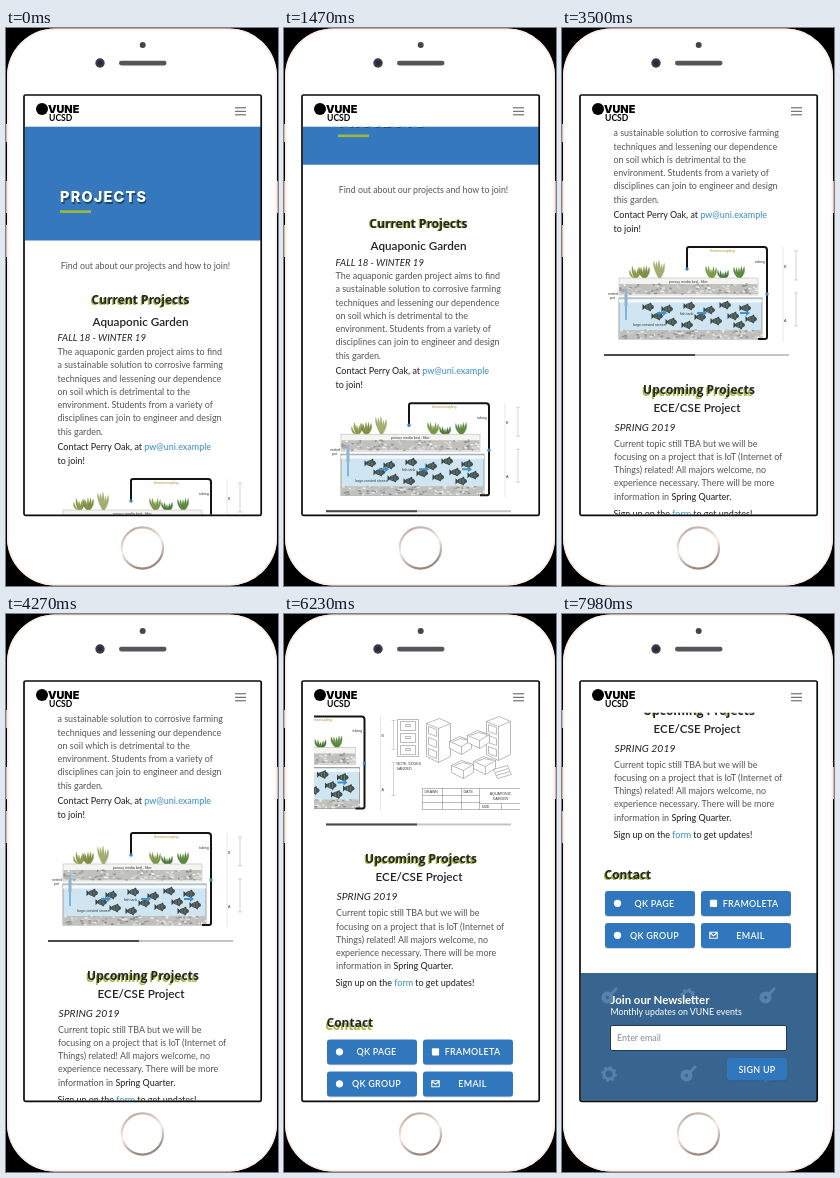
Recreate the animation shown at these times as an HTML page. Size 272 by 558 pixels, loop 8.05 s.

```html
<!DOCTYPE html>
<html lang="en">
<head>
<meta charset="utf-8">
<title>Projects page on a phone</title>
<style>
  html, body { margin: 0; width: 100%; height: 100%; overflow: hidden; background: #000; }
  body > svg { display: block; width: 100vw; height: 100vh; }
  text { font: 8.95px Lato, sans-serif; fill: #555; white-space: pre; }
  .mid { text-anchor: middle; }
  .intro { font-size: 8.8px; text-anchor: middle; }
  .dark { fill: #2c2c2c; font-weight: 500; }
  .link { fill: #4694cb; }
  .italic { font-style: italic; font-size: 9.6px; fill: #222; }
  .season { font-style: italic; font-size: 10.4px; fill: #222; }
  .sub { font-size: 11.7px; font-weight: 600; fill: #222; text-anchor: middle; }
  .fancy { font: 700 12px "Open Sans", sans-serif; fill: #242424; }
  .fancy.glow { fill: #a3b63c; }
  .hero { font: 800 14.4px Inter, sans-serif; letter-spacing: 1.25px; fill: #fff; }
  .hero.shade { fill: #000; opacity: .4; }
  .brand { font: 900 10.8px Inter, sans-serif; fill: #000; }
  .campus { font: 700 8.6px Lato, sans-serif; fill: #000; }
  .button { fill: #fff; font-weight: 600; letter-spacing: .3px; text-anchor: middle; }
  .join { fill: #fff; font-size: 11.4px; font-weight: 700; }
  .note { fill: #fff; font-size: 8.8px; }
  .hint { fill: #8b8b8b; }
  .tiny { font: 3.6px "Liberation Sans", sans-serif; fill: #333; }
  .amber { fill: #b8862f; }
  .plan { fill: #fff; stroke: #777; stroke-width: .5; }
</style>
</head>
<body>
<svg viewBox="0 0 272 558" preserveAspectRatio="none">
  <defs>
    <clipPath id="screen"><rect x="19" y="68" width="236" height="418.5"/></clipPath>
    <clipPath id="slides"><rect x="30" y="448" width="206" height="99"/></clipPath>
    <linearGradient id="ring" x2=".35" y2="1">
      <stop stop-color="#b39d93"/><stop offset=".3" stop-color="#d9c8bf"/>
      <stop offset=".55" stop-color="#f6efeb"/><stop offset="1" stop-color="#9b877e"/>
    </linearGradient>
    <g id="fish">
      <path d="M-6.5-3 L-3.4 0 L-6.5 3.2 Z M-1.5-2.4 L2-4.6 L2.6-2 Z M-1.5 2.4 L1.5 4.4 L2.6 2 Z" fill="#33413f"/>
      <ellipse rx="5" ry="3" fill="#43514f"/><path d="M-2-2V2M1-2.3V2.3" stroke="#8a9791" stroke-width=".6"/>
    </g>
    <g id="gear" fill="none" stroke="#5483ad">
      <circle r="5" stroke-width="3"/><circle r="7" stroke-width="1.6" stroke-dasharray="2.75"/>
    </g>
    <g id="key" fill="#5483ad">
      <circle cx="-1.5" cy="1.5" r="6"/><path d="M2-2 L8-8" stroke="#5483ad" stroke-width="2.6"/>
      <circle cx="-1.5" cy="1.5" r="1.7" fill="#38658f"/>
    </g>
  </defs>

  <path d="M0 96h2v18H0ZM0 153h2v32H0ZM0 197h2v32H0ZM270 153h2v32h-2Z" fill="#d9b9a8"/>
  <rect x="1" y=".5" width="270" height="557" rx="48" fill="#ecd9cf"/>
  <rect x="1.8" y="1.3" width="268.4" height="555.4" rx="47" fill="#fff" stroke="#fbece4" stroke-width="1.6"/>
  <circle cx="136.7" cy="17" r="3" fill="#45464b"/>
  <circle cx="94" cy="35" r="4.7" fill="#3a3b42"/><circle cx="94" cy="35" r="2.2" fill="#20284a"/>
  <rect x="113" y="32.8" width="47.5" height="4.6" rx="2.3" fill="#55565b"/>
  <circle cx="136.4" cy="520" r="20.6" fill="#fff" stroke="url(#ring)" stroke-width="2.2"/>

  <rect x="18" y="67" width="237.2" height="420.3" rx="1.5" fill="#fff"/>
  <g clip-path="url(#screen)">
    <g id="page"></g>
    <rect x="18" y="67" width="238" height="31.7" fill="#fff"/>
    <circle cx="36" cy="81" r="6" fill="#000"/>
    <text class="brand" x="42" y="84.5">VUNE</text>
    <text class="campus" x="43" y="93.4">UCSD</text>
    <path d="M229 79.8h11M229 83.3h11M229 86.8h11" stroke="#555"/>
  </g>
  <rect x="18" y="67" width="237.2" height="420.3" rx="1.5" fill="none" stroke="#0b0b0d" stroke-width="1.7"/>
</svg>

<script>
const LOOP = 8050, STEP = 70;

let seed = 7;
const random = () => (seed = seed * 16807 % 2147483647) / 2147483647;

const text = (x, y, content, cls = '') => `<text x="${x}" y="${y}" class="${cls}">${content}</text>`;
const rect = (x, y, w, h, fill, extra = '') =>
  `<rect x="${x}" y="${y}" width="${w}" height="${h}" fill="${fill}" ${extra}/>`;
const path = (d, stroke, width = 1, fill = 'none') =>
  `<path d="${d}" stroke="${stroke}" stroke-width="${width}" fill="${fill}"/>`;
const plan = d => `<path class="plan" d="${d}"/>`;
const repeat = (n, draw) => Array.from({ length: n }, (_, i) => draw(i)).join('');
const lines = (x, y, step, rows) => rows.map((row, i) => text(x, y + i * step, row)).join('');
const fancy = (x, y, content, cls = '') =>
  `<g class="glow-shift" data-y="${y}">${text(x, y, content, 'fancy glow ' + cls)}</g>` + text(x, y, content, 'fancy ' + cls);

const gravel = (x, y, w, h) => rect(x, y, w, h, '#c2c0bc') + repeat(150, () => {
  const shade = 140 + random() * 105 | 0;
  return `<ellipse cx="${x + random() * w}" cy="${y + random() * h}" rx="${1 + random()}" ry=".9" fill="rgb(${shade},${shade},${shade})"/>`;
});

const plant = (x, height, color) => repeat(5, i => {
  const lean = (i - 2) * 2.6, tip = 482 - height * (.65 + random() * .35);
  return path(`M${x} 483Q${x + lean - 2} ${tip + 6} ${x + lean} ${tip}Q${x + lean + 2} ${tip + 7} ${x + 1} 483`, color, .3, color);
});

function tankSlide() {
  const fishSpots = [[87, 511], [106, 513], [128, 510], [148, 514], [164, 509], [184, 512], [96, 520],
    [139, 521], [155, 525], [172, 520], [190, 523], [110, 526], [126, 529], [178, 529]];
  return plant(73, 12, '#8c9a4c') + plant(82, 13, '#7f8f45') + plant(97, 19, '#a3ad72')
    + plant(149, 13, '#7d9a4a') + plant(161, 8, '#4d7a3c') + plant(177, 12, '#5d8a42')
    + rect(57, 482, 139, 17, '#f4f4f1', 'stroke="#bbb" stroke-width=".6"') + gravel(57.5, 488, 138, 10)
    + text(107, 487, 'porous media bed - filter', 'tiny')
    + rect(57, 502, 143, 41, '#cfe5f1', 'stroke="#999" stroke-width=".9"')
    + path('M57 505H200', '#f3f9fc', 3) + gravel(57.5, 534, 142, 8.5)
    + fishSpots.map(([x, y]) => `<use href="#fish" x="${x}" y="${y}"/>`).join('')
    + [95, 135, 178].map(x => path(`M${x} 516h6v-2l4 3-4 3v-2h-6Z`, 'none', 0, '#3f93cc')).join('')
    + text(118, 519, 'fish tank', 'tiny') + text(71, 530, 'large-crested stones', 'tiny')
    + text(46, 499, 'netted', 'tiny') + text(48, 503, 'pot', 'tiny')
    + path('M64 493V510', '#8fb4cc', 3) + path('M64 510v14', '#5ba3d4', 1.4)
    + path('M125 474V453Q125 451 127 451H202Q205 451 205 454V541Q205 543 203 543H196', '#141414', 2)
    + '<circle cx="125" cy="473" r="1.7" fill="#3c86bd"/><circle cx="205" cy="498" r="1.7" fill="#3c86bd"/>'
    + text(148, 455.5, 'thermocoupling', 'tiny amber') + text(193, 466.5, 'tubing', 'tiny');
}

const frontCabinet = (x, y) => plan(`M${x} ${y}h21v37h-21Z`)
  + repeat(3, i => plan(`M${x + 3} ${y + 2 + i * 12}h15v9h-15ZM${x + 8} ${y + 5 + i * 12}h5v2h-5Z`));
const solidCabinet = (x, y) => plan(`M${x} ${y + 4}l13-5 11 5v33l-12 6-12-6ZM${x} ${y + 4}l12 5v34M${x + 12} ${y + 9}l12-5`)
  + repeat(3, i => plan(`M${x + 2} ${y + 7 + i * 11}l8 3v7l-8-3Z`));
const drawer = (x, y) => plan(`M${x - 11} ${y - 3}l10-5 12 4-10 6ZM${x - 11} ${y - 3}v7l12 6 10-6v-8M${x + 1} ${y + 2}v8M${x - 8} ${y - 3}l8-3 8 2`);

function planSlide() {
  return rect(221, 451, 165, 94, '#fff') + path('M221 451V545', '#ccc', .5)
    + text(222, 472, 'B', 'tiny') + text(222, 526, 'A', 'tiny')
    + path('M234 455v29m-2-29h4m-4 29h4m-2 13v33m-2-33h4m-4 33h4', '#aaa', .5)
    + frontCabinet(238, 454) + solidCabinet(267, 454) + solidCabinet(327, 452)
    + drawer(301, 479) + drawer(319, 473) + drawer(303, 503) + drawer(325, 499)
    + plan('M334 504l14-4 4 9-14 4ZM336 507l13-4M337 510l13-4')
    + text(237, 500, 'NOTE: EDGES', 'tiny') + text(237, 505, 'SANDED', 'tiny')
    + plan('M263 523H362V544H263ZM263 530H320M263 537H320M283 523V544M302 523V544M320 523V544M320 538H362M342 538V544')
    + text(341, 530, 'AQUAPONIC', 'tiny mid') + text(341, 535, 'GARDEN', 'tiny mid')
    + text(265, 528, 'DRAWN', 'tiny') + text(304, 528, 'DATE', 'tiny') + text(322, 542.5, 'SIZE', 'tiny');
}

const dot = (x, y) => `<circle cx="${x}" cy="${y}" r="3.6" fill="#fff"/>`;
const square = (x, y) => rect(x - 3.6, y - 3.6, 7.2, 7.2, '#fff', 'rx="1"');
const envelope = (x, y) => path(`M${x - 3.7} ${y - 3}h7.4v6h-7.4ZM${x - 3.7} ${y - 2.5}l3.7 3 3.7-3`, '#fff', 1.1);
const panel = (x, y, w, h) => rect(x, y + .8, w, h, '#00000030', 'rx="3"') + rect(x, y, w, h, '#3177bd', 'rx="3"');
const button = (x, y, label, icon) =>
  panel(x, y, 90, 25) + icon(x + 12.5, y + 12.3) + text(x + 49.5, y + 15.6, label, 'button');

document.getElementById('page').innerHTML =
  rect(18, 60, 238, 152.5, '#3578bd')
  + text(55.2, 175.6, 'PROJECTS', 'hero shade') + text(54, 174.4, 'PROJECTS', 'hero')
  + rect(54, 182.3, 31, 2.6, '#9db83a')
  + text(139.5, 241, 'Find out about our projects and how to join!', 'intro')
  + fancy(134.5, 275.5, 'Current Projects', 'mid')
  + text(134.5, 298, 'Aquaponic Garden', 'sub')
  + text(51.5, 313.3, 'FALL 18 - WINTER 19', 'italic')
  + lines(51.5, 327, 13.25, [
    'The aquaponic garden project aims to find', 'a sustainable solution to corrosive farming',
    'techniques and lessening our dependence', 'on soil which is detrimental to the',
    'environment. Students from a variety of', 'disciplines can join to engineer and design', 'this garden.'])
  + text(51.5, 422, 'Contact Perry Oak, at <tspan class="link">pw@uni.example</tspan>', 'dark')
  + text(51.5, 435.5, 'to join!', 'dark')
  + `<g clip-path="url(#slides)"><g id="track">${tankSlide()}${planSlide()}</g></g>`
  + rect(42, 558, 185, 2, '#c4c4c4') + rect(42, 558, 91, 2, '#4a4a4a')
  + fancy(137, 597.5, 'Upcoming Projects', 'mid')
  + text(135, 616, 'ECE/CSE Project', 'sub')
  + text(52.5, 634.6, 'SPRING 2019', 'season')
  + lines(52, 651, 13.15, [
    'Current topic still TBA but we will be', 'focusing on a project that is IoT (Internet of',
    'Things) related! All majors welcome, no', 'experience necessary. There will be more',
    'information in <tspan class="dark">Spring Quarter.</tspan>'])
  + text(51.5, 721, 'Sign up on the <tspan class="link">form</tspan> to get updates!', 'dark')
  + fancy(42.5, 762, 'Contact')
  + button(43, 774, 'QK PAGE', dot) + button(139, 774, 'FRAMOLETA', square)
  + button(43, 806, 'QK GROUP', dot) + button(139, 806, 'EMAIL', envelope)
  + rect(18, 856, 238, 140, '#38658f')
  + repeat(6, i => `<use href="#${i % 2 ? 'gear' : 'key'}" x="${47 + i % 3 * 79}" y="${i < 3 ? 879 : 957}"/>`)
  + text(48.5, 887, 'Join our Newsletter', 'join')
  + text(48.5, 898, 'Monthly updates on VUNE events', 'note')
  + rect(48.5, 908.5, 176, 25, '#fff', 'rx="1.5" stroke="#24384c"')
  + text(55, 923.8, 'Enter email', 'hint')
  + panel(165, 941, 60, 22.5) + text(195, 956, 'SIGN UP', 'button');

const scrollKeys = [[0, 0], [980, 49.3], [2240, 103], [2380, 103], [3430, 232], [5600, 232], [6650, 438], [7400, 497], [LOOP, 497]];
const slideKeys = [[0, 0], [4410, 0], [5320, 124.5], [LOOP, 124.5]];

// Smooth curve through the keys that never overshoots and rests on flat parts.
function follow(keys, t) {
  const slope = i => (keys[i + 1][1] - keys[i][1]) / (keys[i + 1][0] - keys[i][0]);
  const tangent = i => {
    if (i === 0 || i === keys.length - 1) return slope(i && i - 1);
    const a = slope(i - 1), b = slope(i);
    return a * b > 0 ? 2 * a * b / (a + b) : 0;
  };
  const i = keys.findIndex((key, k) => t < keys[k + 1][0]);
  const [t0, v0] = keys[i], [t1, v1] = keys[i + 1];
  const span = t1 - t0, u = (t - t0) / span;
  return v0 + (v1 - v0) * u * u * (3 - 2 * u)
    + span * u * (1 - u) * ((1 - u) * tangent(i) - u * tangent(i + 1));
}

const page = document.getElementById('page'), track = document.getElementById('track');
const glows = document.querySelectorAll('.glow-shift');

function render(now) {
  const t = Math.floor(now % LOOP / STEP) * STEP;
  const scroll = follow(scrollKeys, t);
  page.setAttribute('transform', `translate(0 ${-scroll})`);
  track.setAttribute('transform', `translate(${-follow(slideKeys, t)} 0)`);
  for (const glow of glows)
    glow.setAttribute('transform', `translate(-1.3 ${(glow.dataset.y - scroll - 200) * .014})`);
  requestAnimationFrame(render);
}
render(performance.now());
</script>
</body>
</html>
```
